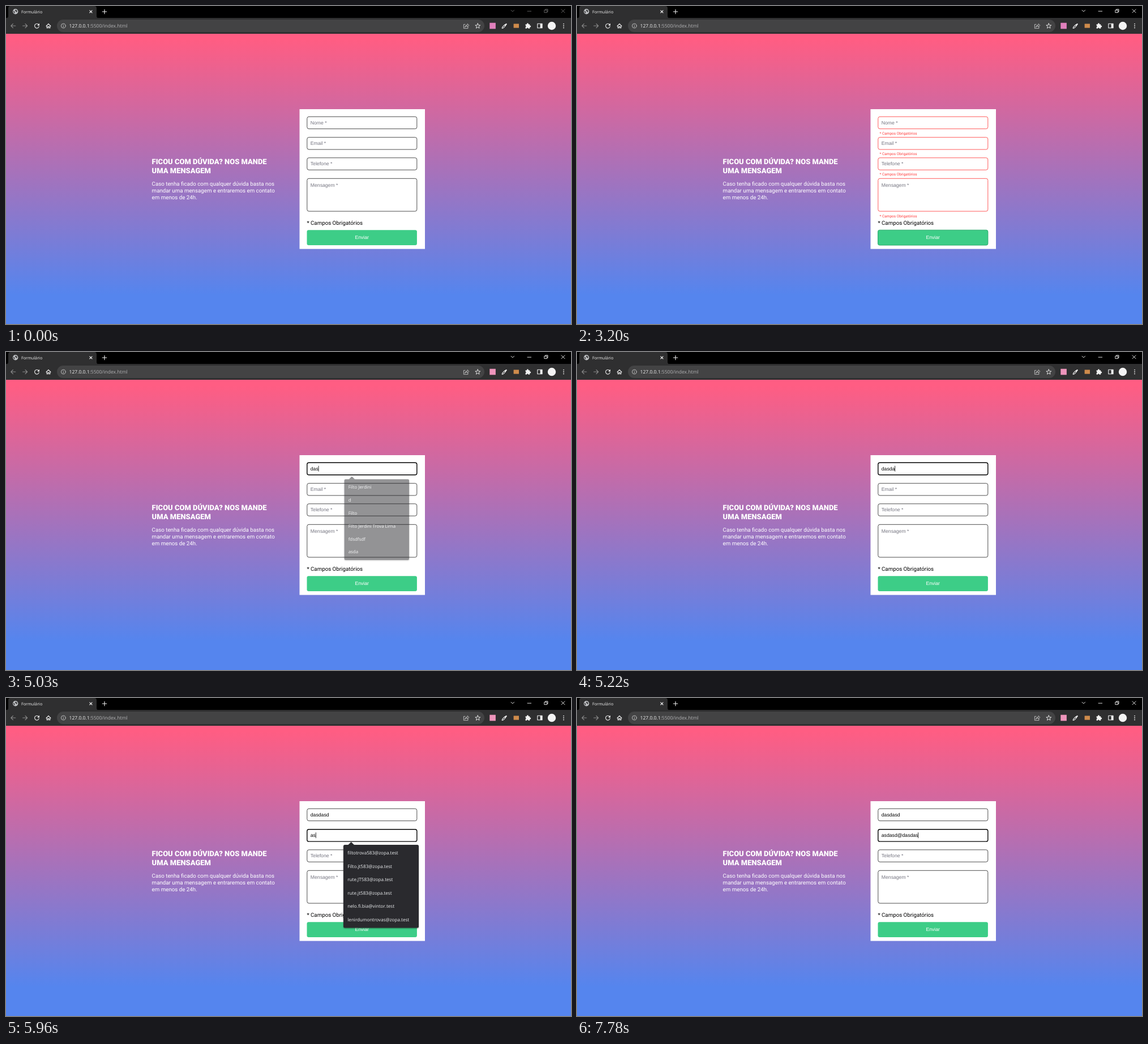
Write an HTML page that moves like this. It is 998 px wide and 561 px high and loops after 8 s.

```html
<!DOCTYPE html>
<html lang="pt">
<head>
<meta charset="utf-8">
<title>Formulário</title>
<style>
  html, body { margin: 0; width: 100%; height: 100%; overflow: hidden; background: #000; }
  svg { display: block; width: 998px; height: 561px; }
  text { text-rendering: geometricPrecision; white-space: pre; }
  .ui { font-family: "Open Sans", "Noto Sans", sans-serif; }
  .page { font-family: Roboto, sans-serif; font-size: 9.745px; }
  .field { font-family: Arial, "Liberation Sans", sans-serif; font-size: 8.663px; }
  .icon { fill: none; stroke: #f1f1f1; stroke-width: 1.1; stroke-linecap: round; stroke-linejoin: round; }
  .dim { stroke: #8b8b8b; }
  .soft { stroke: #c4c4c4; stroke-width: .9; }
</style>
</head>
<body>
<svg id="stage" viewBox="0 0 998 561">
  <defs>
    <linearGradient id="sky" x1="0" y1="0" x2="0" y2="1">
      <stop offset=".02" stop-color="#ff5d83"/>
      <stop offset=".9" stop-color="#5585ee"/>
    </linearGradient>
    <filter id="shadow" x="-10%" y="-10%" width="120%" height="120%">
      <feDropShadow dx="0" dy="1" stdDeviation="1.2" flood-opacity=".4"/>
    </filter>
  </defs>

  <!-- tab strip -->
  <rect width="998" height="22" fill="#000"/>
  <path d="M0 21.5Q4 21.5 4 17.5V4Q4 0 8 0H156Q160 0 160 4V17.5Q160 21.5 164 21.5Z" fill="#2f2f30"/>
  <g id="globe">
    <circle cx="16.7" cy="9.8" r="4.7" fill="#c3c5c8"/>
    <path d="M13.2 8.2L15.6 10.2V12.8L14.2 12.4L12.8 10ZM16.4 6.2L19.4 7.3L20 9.8L18.4 11.6L17.3 9.6L15.6 8.5Z" fill="#4a4a4c"/>
  </g>
  <path id="spinner" class="icon" stroke-width="1.3" d="M16.7 5.6A4.2 4.2 0 0 1 20.9 9.8"/>
  <text class="ui" x="27" y="12.5" font-size="7.25" fill="#f0f0f0">Formulário</text>
  <path class="icon" d="M147.8 7.8L152 12M152 7.8L147.8 12M174 6.2V13.8M170.2 10H177.8"/>
  <path id="controls" class="icon" stroke-linecap="butt" style="stroke-width:.9"
    d="M892 7.2L894.8 10L897.6 7.2M921 9.2H927.6M951.2 7.2H955.6V11.6H951.2ZM952.6 7V5.8H957V10.2H955.8M981 5.8L987 11.8M987 5.8L981 11.8"/>

  <!-- toolbar -->
  <rect y="21" width="998" height="28" fill="#2f2f30"/>
  <rect x="90" y="24" width="755" height="22" rx="11" fill="#434344"/>
  <path class="icon dim" d="M16.8 35H9M12.4 31.4L8.8 35L12.4 38.6M29.6 35H37.4M34 31.4L37.6 35L34 38.6"/>
  <g id="reload">
    <path class="icon" d="M57.6 32.8A3.9 3.9 0 1 0 58.3 36"/>
    <path d="M59 30.6V34.4H55.2Z" fill="#f1f1f1"/>
  </g>
  <path id="stop" class="icon" d="M51.2 31.6L58 38.4M58 31.6L51.2 38.4"/>
  <path class="icon" d="M71 35.3L75 31.4L79 35.3M72.2 34.6V38.8H74.1V36H75.9V38.8H77.8V34.6"/>
  <g class="icon soft">
    <circle cx="101.3" cy="35" r="3.9"/>
    <path d="M101.3 34.8V37M101.3 33V33.1"/>
    <path d="M811 32.4H808.4V39.4H816V37.4M810.5 37.2Q811 33.6 815 33.4V31.4L818 34.3L815 37.2V35.2Q812 35.2 810.5 37.2Z"/>
  </g>
  <text class="ui" x="111.6" y="38.2" font-size="8.5" fill="#f1f1f1">127.0.0.1<tspan fill="#b4b4b6">:5500/index.html</tspan></text>
  <path id="star" class="icon" style="stroke-width:.9"/>
  <rect id="badge" x="854.3" y="29.7" width="10.6" height="10.6"/>
  <path class="icon" d="M876.2 39.4L876.8 37.2L881 33L882.6 34.6L878.4 38.8Z"/>
  <path class="icon" style="stroke-width:2.4" d="M882 33.6L883.6 32"/>
  <rect x="896.6" y="31.4" width="9.4" height="7.2" fill="#cf8b4b"/>
  <path d="M917.6 32.2H920V31.6A1.4 1.4 0 0 1 922.8 31.6V32.2H925.2V34.6H925.8A1.4 1.4 0 0 1 925.8 37.4H925.2V39.8H922.6A1.4 1.4 0 0 0 919.8 39.8H917.6V37.2A1.4 1.4 0 0 0 917.6 34.5Z" fill="#f1f1f1"/>
  <path class="icon" d="M938.8 31.2H947V38.8H938.8Z"/>
  <rect x="943.6" y="31" width="3.6" height="8" fill="#f1f1f1"/>
  <circle cx="964" cy="35" r="7.2" fill="#f4f4f4"/>
  <path d="M985 31.6v.01M985 35v.01M985 38.4v.01" class="icon" style="stroke-width:1.9"/>

  <!-- page -->
  <rect y="49" width="998" height="512" fill="url(#sky)"/>
  <g class="page" fill="#fff">
    <g font-size="12.99" font-weight="900">
      <text x="257.6" y="279.4">FICOU COM DÚVIDA? NOS MANDE</text>
      <text x="257.6" y="295.3">UMA MENSAGEM</text>
    </g>
    <text x="257.6" y="317.1">Caso tenha ficado com qualquer dúvida basta nos</text>
    <text x="257.6" y="329.1">mandar uma mensagem e entraremos em contato</text>
    <text x="257.6" y="341.1">em menos de 24h.</text>
  </g>
  <rect x="518.5" y="182" width="221.5" height="246.6" fill="#fff"/>
  <g id="fields"></g>
  <text class="page" x="531.4" y="386.4">* Campos Obrigatórios</text>
  <rect id="button" x="531.5" y="395.2" width="194.4" height="26.8" rx="3" fill="#3dcd87"/>
  <text class="field" x="628.7" y="411.4" text-anchor="middle" fill="#fff">Enviar</text>
  <rect id="caret" width=".8" height="10" fill="#000"/>
  <g id="menus"></g>
</svg>

<script>
const LOOP = 8000;
const $ = id => document.getElementById(id);

function add(parent, tag, attrs, text = '') {
  const node = document.createElementNS('http://www.w3.org/2000/svg', tag);
  for (const key in attrs) node.setAttribute(key, attrs[key]);
  node.textContent = text;
  parent.appendChild(node);
  return node;
}
const set = (node, attrs) => { for (const key in attrs) node.setAttribute(key, attrs[key]); };
const show = (node, on) => { node.style.display = on ? '' : 'none'; };

$('star').setAttribute('d', 'M' + Array.from({ length: 10 }, (_, i) => {
  const r = i % 2 ? 2 : 4.7, a = Math.PI * (i / 5 - .5);
  return (833.3 + r * Math.cos(a)).toFixed(2) + ' ' + (35.4 + r * Math.sin(a)).toFixed(2);
}).join('L') + 'Z');

const fields = [
  ['Nome *', 195.3, 21.4, 208.6, 227.1],
  ['Email *', 231.7, 21.4, 245, 263.2],
  ['Telefone *', 267.8, 21.4, 281.1, 299.4],
  ['Mensagem *', 304.3, 57.8, 318.6, 372.5]
].map(([hint, y, height, baseline, errorY]) => ({
  hint, baseline,
  box: add($('fields'), 'rect', { x: 531.8, y, width: 194, height, rx: 3.2, fill: '#fff' }),
  label: add($('fields'), 'text', { class: 'field', x: 537.8, y: baseline }),
  error: add($('fields'), 'text', { class: 'page', x: 534.6, y: errorY, fill: '#ff3b3b', style: 'font-size:6.5px' }, '* Campos Obrigatórios')
}));

// Autofill list; it fades while shrinking about its centre.
function makeMenu(top, width, items) {
  const height = 146.6;
  const group = add($('menus'), 'g', {});
  const panel = add(group, 'g', { filter: 'url(#shadow)', fill: '#292a2d' });
  add(panel, 'rect', { x: 596, y: top, width, height, rx: 2.5 });
  add(panel, 'path', { d: `M604.3 ${top + .2}L609.7 ${top - 5}L615.1 ${top + .2}Z` });
  items.forEach((item, i) => add(group, 'text',
    { class: 'ui', x: 603.3, y: top + 17.3 + i * 23.46, 'font-size': 8.1, fill: '#eceef0' }, item));
  const cx = 596 + width / 2, cy = top + height / 2;
  return opacity => {
    show(group, opacity > 0);
    const scale = .946 + .054 * opacity;
    set(group, { opacity, transform: `translate(${cx} ${cy}) scale(${scale}) translate(${-cx} ${-cy})` });
  };
}
const nameMenu = makeMenu(222.5, 117.7,
  ['Filto Jerdini', 'd', 'Filto', 'Filto Jerdini Trova Lirna', 'fdsdfsdf', 'asda']);
const mailMenu = makeMenu(259, 133,
  ['filtotrova583@zopa.test', 'Filto.jt583@zopa.test', 'rute.JT583@zopa.test',
   'rute.jt583@zopa.test', 'nelo.fi.bia@vintor.test', 'lenirdumontrovas@zopa.test']);

const typing = [
  { field: 0, text: 'dasdasd', focus: 4500, keys: [4880, 4950, 5030, 5150, 5220, 5290, 5430] },
  { field: 1, text: 'asdasd@dasdas', focus: 5630,
    keys: [5880, 5950, 6020, 6150, 6220, 6300, 7060, 7390, 7470, 7560, 7640, 7780, 7780] }
];

function menuOpacity(t, open, fade, close) {
  if (t < open || t >= close) return 0;
  return t < fade ? 1 : .5;
}

function render(t) {
  const invalid = t >= 500 && t < 3860;
  const loading = t >= 3740 && t < 4200;
  const active = t >= 5630 ? typing[1] : t >= 4500 ? typing[0] : null;

  $('controls').style.stroke = t < 500 ? '#686868' : '#f1f1f1';
  show($('globe'), !loading);
  show($('spinner'), loading);
  set($('spinner'), { transform: `rotate(${t * .4 % 360} 16.7 9.8)` });
  show($('reload'), !loading);
  show($('stop'), loading);
  set($('badge'), { fill: t < 4200 ? '#e080bc' : '#ee94bb' });
  set($('button'), { stroke: invalid ? '#23a566' : 'none', 'stroke-width': .9 });

  fields.forEach((field, i) => {
    const entry = typing.find(e => e.field === i);
    const value = entry ? entry.text.slice(0, entry.keys.filter(k => t >= k).length) : '';
    const focused = active && active.field === i;
    set(field.box, {
      stroke: invalid ? '#ff4a4a' : focused ? '#000' : '#3a3a3a',
      'stroke-width': focused ? 1.4 : .9
    });
    field.label.textContent = value || field.hint;
    set(field.label, { fill: value ? '#000' : '#757580' });
    show(field.error, invalid);

    if (focused) {
      const width = value ? field.label.getComputedTextLength() : 0;
      const since = t - Math.max(active.focus, ...active.keys.filter(k => t >= k));
      set($('caret'), { x: 537.7 + width, y: field.baseline - 7.8 });
      show($('caret'), since % 1000 < 515);
    }
  });
  if (!active) show($('caret'), false);

  nameMenu(menuOpacity(t, 4620, 5030, 5080));
  mailMenu(menuOpacity(t, 5680, 6020, 6070));
}

const start = performance.now();
function tick() {
  render((performance.now() - start) % LOOP);
  requestAnimationFrame(tick);
}
tick();
</script>
</body>
</html>
```
